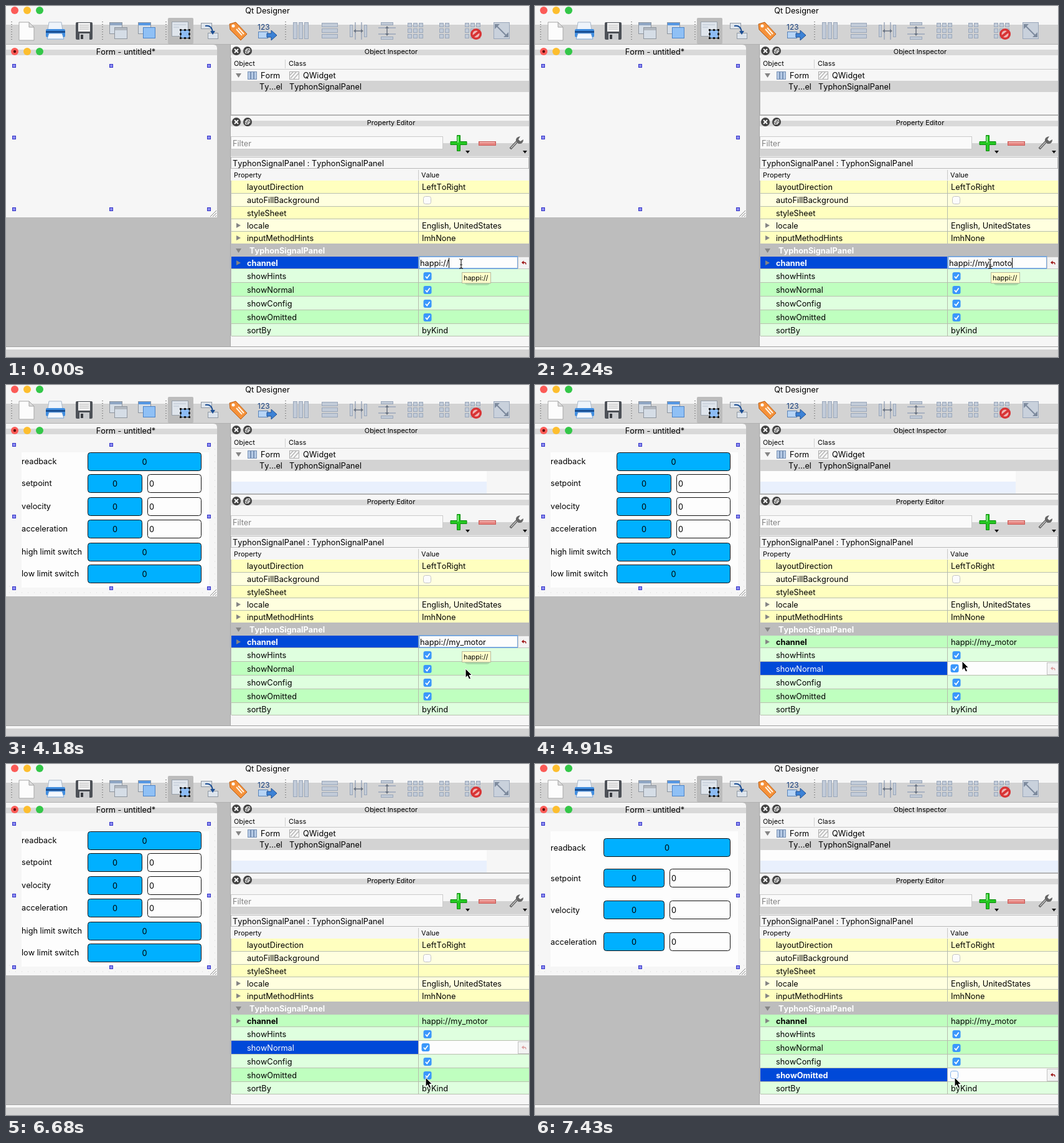
An HTML page that plays this animation: 840 px wide and 563 px high, repeating every 8000 ms.

```html
<!DOCTYPE html>
<html lang="en">
<head>
<meta charset="utf-8">
<title>Designer property editing</title>
<style>
html, body { margin: 0; width: 100%; height: 100%; overflow: hidden; background: #bdbdbd; }
svg { display: block; width: 840px; height: 563px; }
text { font-family: Inter, Roboto, "Liberation Sans", sans-serif; font-kerning: none; white-space: pre; }
</style>
</head>
<body>
<svg id="stage" viewBox="0 0 840 563" xmlns="http://www.w3.org/2000/svg">
  <g id="window"></g>
  <g id="live"></g>
</svg>
<script>
const LOOP = 8000;
const LIGHT = '#f6f6f6', GRAY = '#d3d3d3', BLUE = '#0049d8', CHECK = '#3b97fb';
const $ = id => document.getElementById(id);

const rect = (x, y, w, h, fill, more = '') =>
  `<rect x="${x}" y="${y}" width="${w}" height="${h}" fill="${fill}" ${more}/>`;
const box = (x, y, w, h, fill, stroke, rx = 0) =>
  rect(x + .5, y + .5, w - 1, h - 1, fill, `stroke="${stroke}" rx="${rx}"`);
const path = (d, fill, more = '') => `<path d="${d}" fill="${fill}" ${more}/>`;
const line = (d, stroke, width = 1) => path(d, 'none', `stroke="${stroke}" stroke-width="${width}"`);
const circle = (x, y, r, fill) => `<circle cx="${x}" cy="${y}" r="${r}" fill="${fill}"/>`;
const at = (x, y, content) => `<g transform="translate(${x} ${y})">${content}</g>`;
const text = (x, y, s, { size = 12.75, fill = '#000', anchor = 'start', weight = 400 } = {}) =>
  `<text x="${x}" y="${y}" font-size="${size}" fill="${fill}" text-anchor="${anchor}" font-weight="${weight}">${s}</text>`;
const range = n => [...Array(n).keys()];

const lights = y => ['#fc5b57', '#fdbe2e', '#33c748'].map((c, i) => circle(14 + i * 20, y, 6, c)).join('');
const triangle = y => path(`M370 ${y - 4}l7 4-7 4z`, '#858585');
const openTriangle = y => path(`M369 ${y - 3}h9l-4.500 7z`, '#858585');
const menuMark = (x, y) => path(`M${x} ${y}h7l-3.500 4.500z`, '#111');

// Toolbar icons, each drawn in a 30 x 30 box
const slab = (x, y, w, h) => box(x, y, w, h, '#c2cbd8', '#9aa7ba');
const columns = [2, 11, 20].map(x => slab(x, 1, 7, 27)).join('');
const rows = [2, 11, 20].map(y => slab(2, y, 26, 7)).join('');
const cells = (nx, w) => range(nx * 3).map(i => slab(2 + i % nx * (w + 2), 2 + (i / nx | 0) * 9, w, 7)).join('');
const pane = (x, y, w, h, c) => box(x, y, w, h, '#d5dde6', '#8f969f') + rect(x + 1, y + 1, w - 2, 4, c);
const splitter = slab(1, 5, 5, 20) + slab(24, 5, 5, 20) + line('M10 1v28M20 1v28', '#9aa7ba', 1.5) +
  line('M8 15h14', '#6b7584', 1.5) + path('M7 15l4-3v6zM23 15l-4-3v6z', '#6b7584');
const icons = [
  [18, 25, path('M3 1h16l8 8v21H3z', '#fcfcfc', 'stroke="#a5a5a5"') + path('M19 1v8h8z', '#ddd', 'stroke="#a5a5a5"')],
  [64, 25, path('M5 1h20l2 13H3z', '#eef4fb', 'stroke="#a9b7c8"') + rect(0, 12, 31, 13, '#3f8de0', 'rx="2"') +
    rect(0, 15, 31, 3, '#184f94') + path('M5 19h21l3 9H2z', '#f4f8fd', 'stroke="#7aa6d8"')],
  [110, 25, rect(2, 1, 27, 28, '#4d5157', 'rx="2"') + rect(6, 2, 19, 14, '#f1f1f1') +
    line('M8 6h15M8 9h15M8 12h15', '#bbb') + rect(8, 19, 16, 10, '#c9cbce') + rect(10, 21, 4, 7, '#3b3e43')],
  [165, 25, pane(1, 1, 21, 19, '#8fa6c4') + pane(9, 9, 21, 19, '#b2b8c0')],
  [211, 25, pane(1, 1, 21, 19, '#5597e4') + box(9, 9, 20, 18, '#8fc0f5', '#4b83c8')],
  [266, 24, box(0, 1, 27, 24, '#dfe5ec', '#98a0aa') + line('M3 6h20M3 10h9', '#b9c3d0') +
    box(14, 14, 15, 14, '#8dbcf4', '#345') +
    range(9).filter(i => i !== 4).map(i => rect(13 + i % 3 * 7, 13 + (i / 3 | 0) * 6.5, 3, 3, '#111')).join('')],
  [312, 25, box(1, 2, 18, 10, '#dde4ec', '#9199a3') + box(12, 18, 17, 10, '#dde4ec', '#9199a3') +
    line('M8 7q11-2 12 11', '#1d4f94', 2) + path('M16 15h8l-4 6z', '#1d4f94')],
  [358, 25, path('M1 4l10-3 18 19-10 10L2 13z', '#f5913a', 'stroke="#b85c12"') + circle(7, 7, 2.5, '#fff') +
    line('M12 12l9 10M15 10l9 10', '#fff3e3', 2)],
  [404, 25, text(0, 13, '123', { size: 12, fill: '#173f7d' }) + box(1, 16, 16, 11, '#b7d4f5', '#5b84b8') +
    path('M15 19h7v-5l9 8-9 8v-5h-7z', '#3c82d6', 'stroke="#1e4f92"')],
  [459, 25, columns], [505, 25, rows], [551, 25, splitter],
  [597, 25, `<g transform="rotate(90 15 15)">${splitter}</g>`],
  [643, 25, cells(3, 7)], [694, 25, cells(2, 7)],
  [735, 25, cells(3, 7) + circle(20, 20, 9, '#d83435') + circle(20, 20, 5.5, '#f0b5b5') + line('M15 24l10-8', '#d83435', 4)],
  [781, 25, box(2, 1, 26, 27, '#c9d1dc', '#9aa7ba') + line('M6 6l17 17', '#7d8a9d', 2) +
    path('M4 4h8l-8 8zM26 25h-8l8-8z', '#7d8a9d')]
];

const titleBand = (x, y, w) => rect(x, y, w, 21, LIGHT) + rect(x, y + 8, w, 9, '#d9d9d9');
const dockTitle = (y, label) => titleBand(361, y, 479) +
  circle(370, y + 10, 7, '#424242') + line(`M367 ${y + 7}l6 6m0-6l-6 6`, '#fff', 1.8) +
  circle(388, y + 10, 7, '#424242') +
  path(`M386.500 ${y + 6.5}h5v5h-5zM384.500 ${y + 8.5}h5v5h-5z`, '#424242', 'stroke="#fff"') +
  text(618.5, y + 15, label, { size: 10.9, anchor: 'middle' });

function windowFrame() {
  const small = { size: 10.9 };
  return rect(0, 0, 840, 563, '#bdbdbd') +
    rect(0, 0, 840, 30, LIGHT) + rect(0, 30, 840, 31, GRAY) + rect(0, 61, 840, 1, '#b0b0b0') +
    lights(7) + text(420, 12, 'Qt Designer', { anchor: 'middle' }) +
    [9, 155, 257, 449].map(x => path(`M${x} 25v30`, 'none', 'stroke="#888" stroke-dasharray="1 3" stroke-width="2"')).join('') +
    rect(260, 19, 41, 42, '#bcbcbc', 'rx="2"') +
    icons.map(i => at(...i)).join('') +
    // Form window
    path('M0 339V62H333q6 0 6 6V339z', LIGHT) + rect(0, 70, 339, 9, '#d9d9d9') +
    lights(73) + circle(14, 73, 2.2, '#5c0a08') +
    text(192.5, 77.5, 'Form - untitled*', { anchor: 'middle' }) +
    // Object inspector
    rect(360, 62, 1, 485, '#a9a9a9') + dockTitle(62, 'Object Inspector') +
    rect(362, 83, 478, 91, LIGHT) + rect(362, 101, 478, 1, '#c9c9c9') +
    line('M448.500 86v14', '#d0d0d0') +
    text(366, 96, 'Object', small) + text(454, 96, 'Class', small) +
    rect(361, 174, 479, 2, '#b4b4b4') +
    // Property editor
    dockTitle(176, 'Property Editor') +
    rect(361, 197, 479, 23, LIGHT) + rect(361, 220, 479, 21, GRAY) +
    box(361, 209, 341, 21, '#fafafa', '#cacaca') + text(364, 225, 'Filter', { fill: '#858585' }) +
    path('M724.500 207.500h5v10h10.500v5h-10.500v10h-5v-10h-10.500v-5h10.500z', '#25c822', 'stroke="#0b8a0c"') +
    rect(725, 209, 2, 10, '#8df08a') + menuMark(738, 232) +
    box(759, 217, 28, 7, '#e6837f', '#c85c59') + rect(761, 218, 24, 2, '#f0aaa6') +
    line('M810 229l12-13', '#555', 4) + line('M811 228l11-12', '#c9c9c9', 1.5) +
    path('M819 217q-1-7 7-8l-3 5 3 3 5-3q0 8-8 7z', '#666') + menuMark(830, 232) +
    rect(361, 241, 479, 21, LIGHT) + box(361, 242, 479, 19, LIGHT, '#b9b9b9') +
    text(364, 256.5, 'TyphonSignalPanel : TyphonSignalPanel') +
    rect(361, 262, 479, 18, LIGHT) + line('M662.500 263v16', '#c8c8c8') +
    text(366, 275, 'Property', small) + text(667, 275, 'Value', small) +
    rect(361, 529, 479, 18, LIGHT) +
    rect(0, 546, 840, 1, '#a2a2a2') + rect(0, 547, 840, 4, LIGHT) + rect(0, 551, 840, 12, GRAY);
}

function inspectorRows(edge) {
  return (edge ? rect(362, 138, edge - 362, 17, '#fdfdfd') + rect(362, 155, edge - 362, 19, '#e9f0fd') : '') +
    rect(362, 120, 478, 18, GRAY) + openTriangle(111) +
    [388, 393, 398].map(x => box(x, 105, 5, 13, '#b7cbe6', '#7791b5')).join('') +
    box(455, 105, 16, 13, '#f7f7f7', '#aaa') + line('M457 116l9-10M462 117l8-9M456 111l5-5', '#b5b5b5', 1.5) +
    text(409, 115.5, 'Form') + text(477, 115.5, 'QWidget') +
    text(407, 133.5, 'Ty…el') + text(455, 133.5, 'TyphonSignalPanel');
}

// Form contents: each field is [label, top, has an input]
const ALL_FIELDS = { left: 131, split: 219, label: 18.5, fields: [
  ['readback', 108], ['setpoint', 143, 1], ['velocity', 180, 1],
  ['acceleration', 216, 1], ['high limit switch', 253], ['low limit switch', 288]] };
const MAIN_FIELDS = { left: 110, split: 208, label: 19.7, fields: [
  ['readback', 119], ['setpoint', 168, 1], ['velocity', 219, 1], ['acceleration', 270, 1]] };

function formContents(layout) {
  let out = '';
  if (layout) {
    const { left, split, label, fields } = layout;
    const dots = range(33).map(i => `M${5 + i * 10} 333h1M${5 + i * 10} 323h1`).join('') +
      range(24).map(i => `M325 ${93 + i * 10}h1M335 ${93 + i * 10}h1`).join('');
    out += line(dots, '#d5d5d5') + rect(25, 108, 301, 217, '#fdfdfd');
    for (const [name, y, input] of fields) {
      const right = input ? split : 314;
      out += text(25, y + label, name) + box(left, y, right - left, 30, '#00b0ff', '#111', 4) +
        text((left + right) / 2, y + 19.7, '0', { anchor: 'middle' });
      if (input) out += box(split + 8, y, 306 - split, 30, '#fdfdfd', '#111', 4) + text(split + 11, y + 19.7, '0');
    }
  }
  for (const x of [13, 169, 326]) for (const y of [96, 211, 326])
    if (x !== 169 || y !== 211) out += box(x - 3, y - 3, 6, 6, '#8c8cf0', '#3434c8');
  return out + line('M328 338l10-10M332 338l6-6M336 338l2-2', '#8c8c8c');
}

const PROPERTIES = [
  ['layoutDirection', 280, 'LeftToRight'], ['autoFillBackground', 301, false], ['styleSheet', 322, ''],
  ['locale', 342, 'English, UnitedStates', 1], ['inputMethodHints', 362, 'ImhNone', 1],
  ['TyphonSignalPanel', 382], ['channel', 402, 'happi://my_motor', 1], ['showHints', 422, true],
  ['showNormal', 444, true], ['showConfig', 466, true], ['showOmitted', 488, true], ['sortBy', 510, 'byKind']];

const checkbox = (x, y, on, pressed, focus) => on
  ? rect(x - 6.5, y - 6, 13, 13, pressed ? '#1c6ad0' : CHECK, 'rx="3"') +
    line(`M${x - 3.2} ${y + .8}l2.400 2.800 4.400-6.200`, '#fff', 1.7)
  : box(x - 7, y - 6, 13, 13, '#fcfcfc', focus ? '#7fb0ec' : '#c4c4c4', 3);

function revertButton(mid, active) {
  const c = active ? '#9b1111' : '#dc9d9d';
  return box(822, mid - 10, 19, 20, '#f3f3f3', '#c3c3c3') +
    path(`M828 ${mid - .5}l3.500-3v6z`, c) + line(`M831 ${mid - .5}h2.500q1.500 0 1.500 3`, c, 1.3);
}

function propertyRows(s) {
  return PROPERTIES.map(([name, y, value, nested], i) => {
    const end = i < 11 ? PROPERTIES[i + 1][1] : 530, h = end - y;
    const mid = y + Math.floor(h / 2), base = mid + 4.5;
    if (value === undefined)
      return rect(362, y - 1, 478, h + 1, '#bdbdbd') + openTriangle(mid) +
        text(391, base, name, { fill: '#fff', weight: 700 });
    const selected = name === s.selected;
    const shade = i < 5 ? ['#ffffbf', '#ffffdf'] : ['#bfffbf', '#dfffdf'];
    const changed = name === 'channel' || name === 'showOmitted' && s.unchecked;
    const on = name === 'showOmitted' ? value && !s.unchecked : value;
    let out = rect(362, y, 478, h, shade[i % 2]) + rect(362, end - 1, 478, 1, '#b9c0b0') +
      rect(662, y, 1, h, '#b5bbae');
    if (selected) out += rect(362, y, 300, h - 1, BLUE) + rect(663, y, 177, h - 1, '#fdfdfd');
    if (nested) out += triangle(mid);
    out += text(387, base, name, { fill: selected ? '#fff' : '#000', weight: changed ? 700 : 400 });
    if (typeof value === 'boolean')
      out += checkbox(selected ? 674 : 677, selected ? mid - 1 : mid, on, selected && s.pressed, selected);
    else if (selected)
      out += rect(663.5, y, 158.5, h - 1, '#fdfdfd', 'stroke="#6fa3de" stroke-width="1.8"') +
        `<text id="entry" x="665" y="${base}" font-size="12.75">${s.typed}</text>`;
    else out += text(668, base, value);
    return out + (selected ? revertButton(mid, changed) : '');
  }).join('');
}

const tooltip = () => rect(736, 432, 42, 16, '#555', 'opacity=".22" rx="6"') +
  box(732, 427, 47, 18, '#ffffcb', '#b9b9a0') + text(735, 440, 'happi://', { size: 10.9 });
const beam = ([x, y]) => line(`M${x - 3} ${y - 7}q3 0 3 2v11q0 2-3 2M${x + 3} ${y - 7}q-3 0-3 2v11q0 2 3 2M${x - 2} ${y + 2}h4`, '#222', 1.2);
const arrow = ([x, y]) => at(x, y, path('M0 0v14.500l3.300-3 2.400 5.500 2.800-1.200-2.400-5.300h4.400z', '#000', 'stroke="#fff"'));

// Latest entry whose start time has passed
const pick = (steps, t) => steps.reduce((v, [start, value]) => t >= start ? value : v, steps[0][1]);
const KEYS = [600, 900, 1200, 1500, 1650, 1950, 2240, 2390];
const POINTER = [[0, [731, 413]], [3890, [733, 421]], [4030, [737, 443]], [4180, [738, 455]],
  [4770, [705, 448]], [4910, [686, 443]], [5510, [685, 446]], [5660, [682, 454]], [5810, [677, 465]],
  [5950, [673, 476]], [6100, [670, 486]], [6240, [670, 494]], [6390, [672, 499]], [6530, [673, 502]], [6680, [674, 503]]];

function stateAt(t) {
  return {
    typed: 'happi://' + 'my_motor'.slice(0, KEYS.filter(k => t >= k).length),
    caret: pick([[0, true], [150, false], [600, true], [2990, false], [3440, true], [3890, false]], t),
    selected: pick([[0, 'channel'], [4320, 'showNormal'], [6830, 'showOmitted']], t),
    layout: pick([[0, null], [2390, ALL_FIELDS], [7430, MAIN_FIELDS]], t),
    edge: pick([[0, 0], [2390, 772], [7430, 840]], t),
    pressed: t >= 7280 && t < 7430,
    unchecked: t >= 7430,
    tip: t < 4320,
    arrow: t >= 4030,
    pointer: pick(POINTER, t)
  };
}

let shown = '';
function render(t) {
  const s = stateAt(t), key = JSON.stringify(s);
  if (key === shown) return;
  shown = key;
  const live = $('live');
  live.innerHTML = formContents(s.layout) + inspectorRows(s.edge) + propertyRows(s) +
    (s.tip ? tooltip() : '');
  const entry = $('entry');
  let overlay = '';
  if (entry && s.caret) overlay += rect(Math.round(665 + entry.getComputedTextLength()), 404, 1, 16, '#000');
  overlay += (s.arrow ? arrow : beam)(s.pointer);
  live.insertAdjacentHTML('beforeend', overlay);
}

$('window').innerHTML = windowFrame();
const start = performance.now();
function tick() {
  render((performance.now() - start) % LOOP);
  requestAnimationFrame(tick);
}
tick();
</script>
</body>
</html>
```
